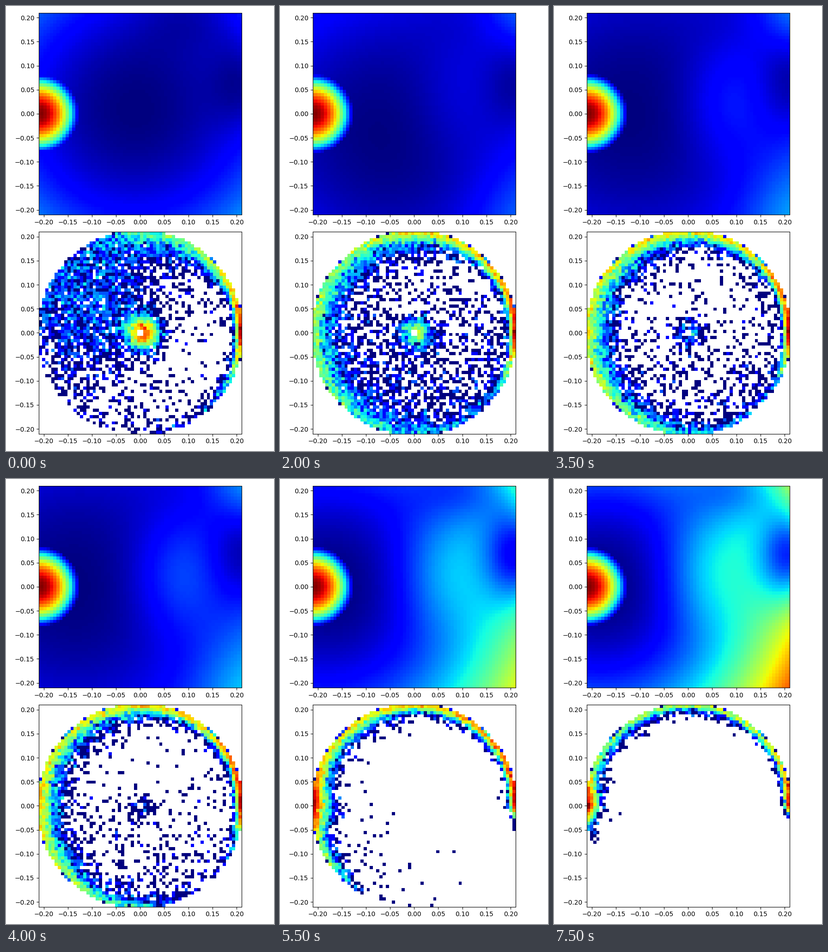
Recreate the animation shown at these times as a matplotlib script. Size 580 px wide and 966 px high, loop 8000 ms.

```python
import numpy as np
import matplotlib.pyplot as plt
from matplotlib.animation import FuncAnimation

W, H, DPI = 580, 966, 100
FRAMES, STEP = 16, 500
L, N = 0.21, 64
SIZE = 438.4
N_MAX = 200

KEYS = np.array([0, 1, 2, 3.5, 4.5, 5.5, 7.5])

# bowl strength, bowl x, bowl y, ridge, ridge x, spot, top dip, corners
FIELD = np.array([
    [2.75, -.01, .01, .00, .08, .12, .10, .00],
    [2.40, -.02, .02, .01, .08, .11, .08, .00],
    [1.60, -.05, -.04, .04, .08, .10, .06, .06],
    [1.40, -.11, .00, .09, .08, .12, .05, .08],
    [1.65, -.155, .00, .15, .07, .18, .06, .07],
    [3.20, -.18, .00, .12, .055, .40, .22, .00],
    [4.20, -.18, .00, .14, .035, .50, .28, .00],
])

# log level of the rim every 45 degrees, counterclockwise from the right
RIM = np.array([
    [.80, .56, .40, .10, -.1, -.4, -.2, .12],
    [.80, .62, .50, .38, .38, .18, .08, .18],
    [.80, .66, .62, .52, .50, .44, .32, .15],
    [.80, .66, .63, .60, .60, .50, .38, .05],
    [.82, .70, .68, .65, .68, .58, .26, -.6],
    [.80, .74, .66, .65, .70, .36, -1., -3.],
    [.72, .60, .55, .50, .58, -1.2, -4., -4.],
])

# left rim width, left peak, core level, log density, heading, focus, outward growth
CLOUD = np.array([
    [.050, .00, .74, -0.6, 150, 1.6, -.5],
    [.038, .00, .64, -0.4, 215, 0.9, 0.0],
    [.022, .00, .48, -0.9, 255, 0.6, 0.6],
    [.017, .00, .20, -2.0, 265, 0.7, 2.0],
    [.011, .10, -.10, -3.4, 245, 1.3, 3.0],
    [.0095, .26, -1.0, -5.8, 215, 2.3, 3.0],
    [.007, .40, -2.0, -9.0, 205, 2.5, 3.0],
])


def at(table, t):
    return [np.interp(t, KEYS, col) for col in table.T]


def gauss(x, y, cx, cy, sx, sy):
    return np.exp(-((x - cx) / sx) ** 2 / 2 - ((y - cy) / sy) ** 2 / 2)


nodes = np.linspace(-L, L, N + 1)
FX, FY = np.meshgrid(nodes, nodes)
SOURCE = 1 - ((FX + L) ** 2 + FY ** 2) / 0.0842 ** 2

mids = (nodes[:-1] + nodes[1:]) / 2
BX, BY = np.meshgrid(mids, mids)
R = np.hypot(BX, BY)
ANGLE = np.degrees(np.arctan2(BY, BX)) % 360
DISK = (R > 0.007) & (R < 0.2142)


def field(t):
    a, cx, cy, ridge, rx, spot, top, corner = at(FIELD, t)
    v = a * ((FX - cx) ** 2 + (FY - cy) ** 2)
    v += ridge * gauss(FX, FY, rx, 0.02, 0.065, 0.085)
    v -= spot * gauss(FX, FY, 0.22, 0.07, 0.05, 0.072)
    v -= top * gauss(FX, FY, 0.13, 0.22, 0.09, 0.06)
    v += corner * (gauss(FX, FY, L, L, 0.05, 0.05) + gauss(FX, FY, L, -L, 0.07, 0.09))
    return np.clip(np.maximum(v, SOURCE), 0, 1)


def counts(t, seed):
    rng = np.random.default_rng(seed)
    width, peak, core, dens, heading, focus, grow = at(CLOUD, t)

    level = np.interp(ANGLE, np.arange(0, 361, 45), at(RIM, t) + [at(RIM, t)[0]])
    east = (ANGLE + 180) % 360 - 180
    level += 0.15 * np.exp(-(east / 14) ** 2)
    level += peak * np.exp(-((ANGLE - 180) / 13) ** 2)
    cos = np.cos(np.radians(ANGLE))
    w = 0.003 + (width - 0.003) * (1 - cos) / 2
    rim = N_MAX ** level * np.exp(-np.maximum(0.2065 - R, 0) / w)

    ring = N_MAX ** (core + 0.09 * cos) * np.exp(-np.maximum(R - 0.015, 0) / 0.009)
    turn = np.cos(np.radians(ANGLE - heading))
    haze = np.exp(dens + focus * turn) * (1 + grow * (R / L) ** 2)

    rate = (rim + ring + haze) * np.exp(-np.maximum(R - 0.2129, 0) / 0.0003)
    rate *= rng.lognormal(0, 0.2, R.shape)
    n = rng.poisson(np.where(DISK, rate, 0))
    return np.ma.masked_where(n == 0, np.log(np.maximum(n, 1)) / np.log(N_MAX))


fig = plt.figure(figsize=(W / DPI, H / DPI), dpi=DPI, facecolor="white")


def panel(top, data, half):
    ax = fig.add_axes([71.1 / W, 1 - (top + SIZE) / H, SIZE / W, SIZE / H])
    im = ax.imshow(data, cmap="jet", vmin=0, vmax=1, origin="lower",
                   interpolation="nearest", aspect="auto",
                   extent=(-half, half, -half, half))
    ax.set(xlim=(-L, L), ylim=(-L, L))
    ticks = np.linspace(-0.2, 0.2, 9)
    ax.set_xticks(ticks)
    ax.set_yticks(ticks)
    return im


top_im = panel(14.7, field(0), L * (N + 1) / N)
low_im = panel(490.2, counts(0, 0), L)


def update(i):
    t = i * STEP / 1000
    top_im.set_data(field(t))
    low_im.set_data(counts(t, i))
    return top_im, low_im


anim = FuncAnimation(fig, update, frames=FRAMES, interval=STEP,
                     repeat=True, repeat_delay=0, blit=False)
plt.show()
```
